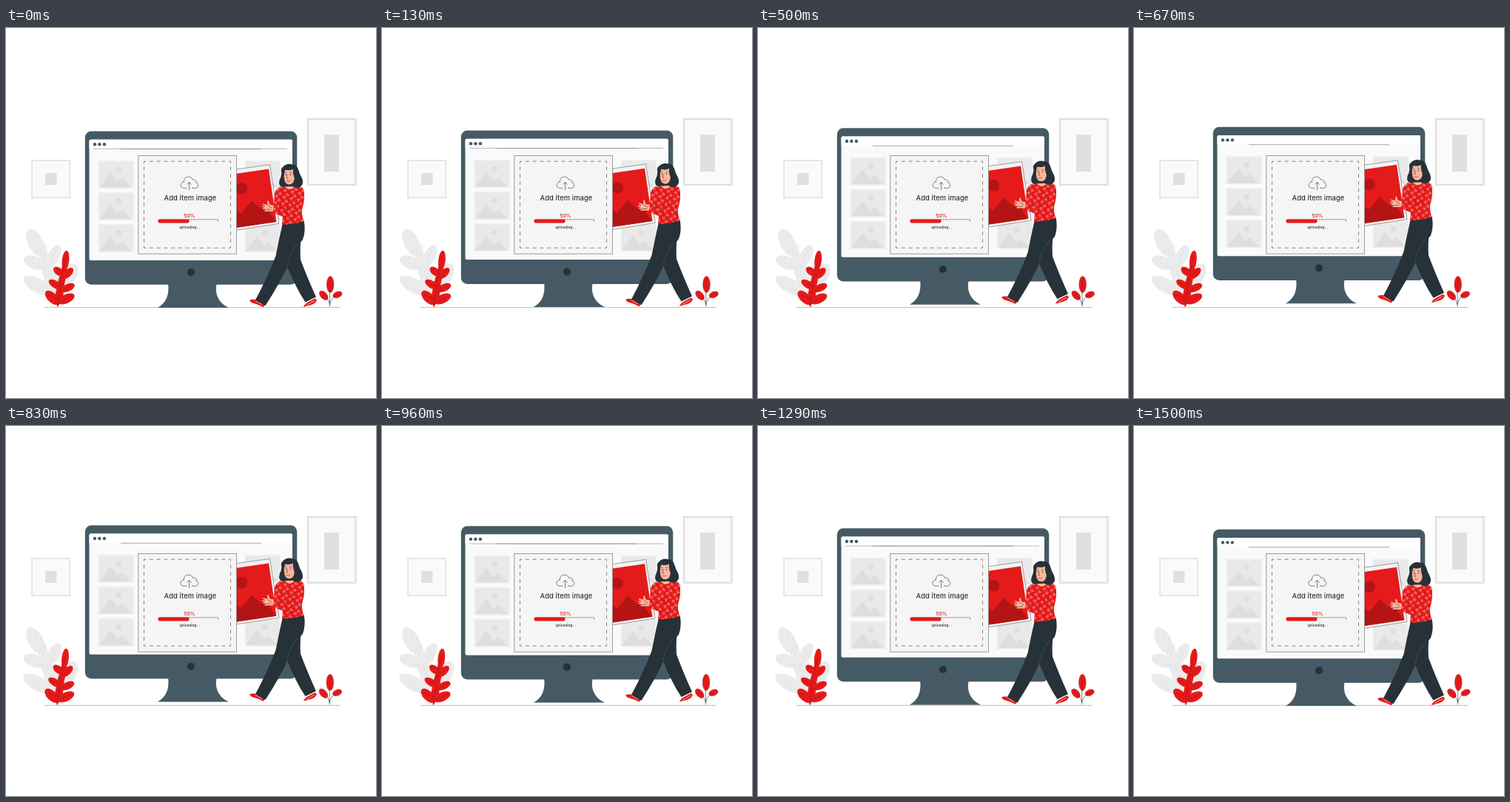
These frames come from a looping animation (500x500 px, 1.54 s). An HTML page:

```html
<!DOCTYPE html>
<html lang="en">
<head>
<meta charset="utf-8">
<title>Add item image</title>
<style>
  html, body { margin: 0; width: 100%; height: 100%; overflow: hidden; background: #fff; }
  svg { display: block; width: 100vw; height: 100vh; }
  text { font-family: Inter, sans-serif; text-anchor: middle; }
  .red { fill: #e51a1a; }
  .dark { fill: #263238; }
  .slate { fill: #455a64; }
  .skin { fill: #ffb59d; }
  .line { fill: none; stroke: #263238; stroke-width: .6; stroke-linecap: round; stroke-linejoin: round; }
  .vein { fill: none; stroke: #a81414; stroke-width: .6; stroke-linecap: round; }
</style>
</head>
<body>
<svg viewBox="0 0 500 500">
  <defs>
    <pattern id="knit" width="10" height="9" patternUnits="userSpaceOnUse" patternTransform="translate(365 215) rotate(10)">
      <path d="M1 2.2L4.4 1.4L3.2 4.6ZM6.4 5.6L9 8.2L5.6 8.4Z" fill="none" stroke="#ffd9d5" stroke-width=".6"/>
    </pattern>
    <g id="thumb">
      <rect x="124.5" y="179" width="48.5" height="38" fill="#f0f0f0"/>
      <rect x="126" y="180.5" width="45.5" height="35" fill="#e9e9e9"/>
      <path d="M126 215.500L141 195.500L151 208L157 202.500L169 215.500Z" fill="#dedede"/>
      <circle cx="152.300" cy="191" r="3.700" fill="#dedede"/>
    </g>
  </defs>

  <rect width="500" height="500" fill="#fff"/>

  <!-- wall frames -->
  <g fill="#fafafa" stroke="#e0e0e0">
    <rect x="35" y="179" width="51.300" height="50.300" stroke-width="1.600"/>
    <rect x="408" y="123" width="64.500" height="88.700" stroke-width="2.400"/>
  </g>
  <path d="M53 196h15.500v16h-15.500ZM430 144h20v50h-20Z" fill="#e0e0e0"/>

  <g id="backPlant" fill="#ebebeb"></g>
  <path d="M72 376C64 340 48 302 37 281M45 299L33 315M57 326L67 302M59 330L35 317M68 358L88 330M70 366L33 346" fill="none" stroke="#e0e0e0" stroke-width=".7"/>
  <path d="M52 377.500H452" stroke="#aaa" stroke-width=".7"/>

  <g id="float">
    <!-- monitor -->
    <path class="slate" d="M219 344C221 360 217 371 205 378H301C288 372 281 360 285 344Z"/>
    <rect class="slate" x="106.800" y="139.500" width="286.500" height="207.300" rx="8.500"/>
    <rect x="112.500" y="150.700" width="274.500" height="163.300" rx="2" fill="#fafafa"/>
    <path d="M112.500 163V152.700q0-2 2-2H385q2 0 2 2V163Z" fill="#fff"/>
    <g class="slate">
      <circle cx="120" cy="157.200" r="2.200"/><circle cx="126.400" cy="157.200" r="2.200"/><circle cx="132.900" cy="157.200" r="2.200"/>
    </g>
    <path id="ends" d="M118 163.300H380" stroke="#999" stroke-width=".7"/>
    <path d="M155 163.500H345" stroke="#888" stroke-width=".7"/>
    <circle class="dark" cx="250" cy="330.200" r="5.100"/>
    <use href="#thumb"/><use href="#thumb" y="43"/><use href="#thumb" y="86"/>
    <use href="#thumb" x="198"/><use href="#thumb" x="198" y="43"/><use href="#thumb" x="198" y="86"/>

    <!-- photo card -->
    <path d="M300 192.500L356.500 184.700L369 264.300L300 275Z" fill="#f3f3f3" stroke="#777" stroke-width=".7"/>
    <path class="red" d="M300 198.600L355 190.600L365.500 262L300 271.500Z"/>
    <path d="M300 242L311 246L317.500 251L332.500 233.500L344 244.500L349.500 240L364.500 262L300 271.500Z" fill="#b41414"/>
    <circle cx="318.200" cy="217" r="7.700" fill="#b41414"/>

    <!-- legs and shoes -->
    <path class="red" d="M329.500 367.500Q334 366 339 367.500L350 374L347.500 377.300Q341 373.500 333 371.500Q329.500 370 329.500 367.500Z"/>
    <path class="red" d="M402 377Q403.500 373 408 370.500L417.500 365.500L420 367.500Q418.500 372 413 374Q407 375.500 402 377Z"/>
    <path d="M337 368.500L346 374M406 374.500L417 368.500" stroke="#fff" stroke-width=".6"/>
    <path class="dark" d="M378 278L380 322Q391 350 404.500 370.500L419 363.500Q407 337 398 313Q397 298 399 280Z"/>
    <path class="dark" d="M374 263Q369 285 364.500 308Q353 338 337 367.500L350.500 375.200Q369 347 382 319Q391 297 401 286Q405.500 274 402.500 260Z"/>
    <path d="M380 322Q382 306 394 291" fill="none" stroke="#55656c" stroke-width=".5"/>

    <!-- torso -->
    <path id="body" class="red" d="M375 213.500Q365 215 363 224L361.500 243L374 254L373 265.500Q388 266 402.500 261Q398.500 251 400.500 240Q404.500 224 402 217.500Q398 212.500 390 212.500Z"/>
    <path class="skin" d="M377 206H389.500L391 213.500Q385 222 376 214Z"/>

    <!-- hands -->
    <path class="skin" d="M363 240L356.500 238.800L354.500 233Q352.500 233 353.500 239L347 237.500Q345.700 238.500 351 241L346 240.800Q344.500 242 350.500 243.200L346.500 243.800Q346 245.500 352 245.500L349 247Q350 248.500 355 247.500L363 248Z"/>
    <path class="line" d="M354 240L359 243M352 245.500L358 245" stroke="#d98775"/>
    <path class="red" d="M402 219Q405 231 399.500 247Q397 256 387 257.500Q372 256 360.500 248.500L362 240.200Q374 245 385 243.500L388 226Z"/>
    <path fill="url(#knit)" d="M375 213.500Q365 215 363 224L361.500 240L360.500 248.500L374 254L373 265.500Q388 266 402.500 261Q398.500 251 400.500 240Q404.500 224 402 217.500Q398 212.500 390 212.500Q384 220 375 213.500Z"/>
    <path class="vein" d="M362 240.500Q374 245 385 243.500L388 232M374 254Q381 257.500 388 257.300"/>

    <!-- head -->
    <path class="dark" d="M374 188Q379 182.500 386 184.200Q393 184.500 395 191Q396.500 197 400 203Q403 211 398 214.500Q393 217.500 387 214L377 214.500Q370 216.500 369 209.500Q369 206 371.500 201Q373 196 371.800 192Q372 189 374 188Z"/>
    <path class="skin" d="M377.500 191.500Q384 193.500 388.500 190.500Q391 197 389.500 205Q388 212 382 211.500Q376.500 211 375.800 202Q375.500 196 377.500 191.500Z"/>
    <path class="dark" d="M375.500 191Q384 194 388 189Q387 198 391 205Q395 198 391 188L381 185Z"/>
    <path class="line" d="M377.300 196.200L379 195.200M383.500 195.300L386 196M380.200 199L379 203L380.700 203.300"/>
    <circle class="dark" cx="378.800" cy="198.300" r=".75"/><circle class="dark" cx="384.500" cy="198.500" r=".75"/>
    <path d="M379 206.500Q381.500 208.500 384 206.200" fill="none" stroke="#c52c2c" stroke-width=".8"/>
  </g>

  <!-- upload panel -->
  <rect x="178.800" y="172.500" width="132.700" height="132.700" fill="#f5f5f5" stroke="#858585" stroke-width=".8"/>
  <rect x="186.500" y="180.200" width="117" height="117" fill="none" stroke="#666" stroke-width=".8" stroke-dasharray="5 4.750" stroke-dashoffset="2.500"/>
  <path class="line" stroke="#555" d="M244 216.300H240.500C234.500 216.300 234.500 208.500 240.300 208.200C239.500 200 250.500 198.500 252.300 205.300C256 204.200 257.500 207.200 256.800 209C261 209.500 260.500 216.300 256 216.300H251.500M247.600 218.800V208.500M244.800 211.300L247.600 208.300L250.400 211.300"/>
  <text x="249" y="233.200" font-size="9.300" font-weight="500" letter-spacing=".12" fill="#263238">Add item image</text>
  <text x="248" y="255.700" font-size="6.800" font-weight="500" fill="#e51a1a">50%</text>
  <path d="M207 258.800H286.500V262.300" fill="none" stroke="#777" stroke-width=".7"/>
  <rect class="red" x="205.300" y="258.500" width="42.300" height="4.900" rx="2.300"/>
  <text x="248" y="271" font-size="4.900" font-weight="500" fill="#263238">uploading...</text>

  <!-- swaying plants -->
  <g id="leaf">
    <g id="frontPlant" class="red"></g>
    <path class="vein" d="M69.500 376Q73 342 81 309M77 328L67 326M75.500 338L88 327M73.500 350L61 344M72.500 357L89 348M71 366L57 361M70 372L88 363"/>
  </g>
  <g id="sprig">
    <path class="line" d="M437.500 376V345M437.700 374Q437 368 431 362.500M437.700 373Q439 365 447 360.500"/>
    <g id="sprigLeaves" fill="#e51a1a" stroke="#b41414" stroke-width=".5"></g>
    <path class="vein" d="M438 357V340M434.500 366L427 358M443 363L450 359.500"/>
  </g>
</svg>
<script>
const LOOP = 1540;
const $ = id => document.getElementById(id);

// Each leaf: x, y, rx, ry, angle
const leaves = list => list.map(([x, y, rx, ry, a]) =>
  `<ellipse cx="${x}" cy="${y}" rx="${rx}" ry="${ry}" transform="rotate(${a} ${x} ${y})"/>`).join('');

$('backPlant').innerHTML = leaves([
  [40, 290, 20, 10, 62], [38, 317, 15, 8.5, 20], [64, 309, 17, 8, -62],
  [43, 348, 22, 9.5, 30], [82, 337, 22, 11, -55]
]) + '<path d="M42 292L54 294L58 314L70 330L82 350L72 377L58 364L52 340L46 322Z"/>';

$('frontPlant').innerHTML = leaves([
  [80.5, 314, 4.8, 13.2, 6], [83.5, 331.5, 9.5, 5, -45], [71, 329, 8, 5, 40],
  [83.5, 351, 10, 5, -25], [66.5, 346.5, 10, 5, 32],
  [81.5, 366, 12, 6, -25], [62.5, 364.5, 12, 6.5, 45]
]) + '<path d="M77 318L83 326L79 346L77 364L69.500 377.500L66 364L70 344Z"/>';

$('sprigLeaves').innerHTML = leaves([
  [438.2, 346.5, 4.8, 11, 0], [429.3, 361.3, 7.3, 4.3, 48], [448, 360.4, 6.4, 4, -22]
]);

// Smooth periodic curve through [time, value] points
function curve(pts) {
  const n = pts.length;
  const at = i => {
    const k = Math.floor(i / n), [t, v] = pts[i - k * n];
    return [t + k * LOOP, v];
  };
  const slope = i => {
    const [t0, v0] = at(i - 1), [t1, v1] = at(i + 1);
    return (v1 - v0) / (t1 - t0);
  };
  return t => {
    let i = 0;
    while (i < n - 1 && t >= pts[i + 1][0]) i++;
    const [t0, v0] = at(i), [t1, v1] = at(i + 1), d = t1 - t0, u = (t - t0) / d;
    const ease = u * u * (3 - 2 * u);
    return v0 + (v1 - v0) * ease
      + d * u * (1 - u) * ((1 - u) * slope(i) - u * slope(i + 1));
  };
}

const lift = curve([[0, 0], [290, -2.1], [500, -4.2], [670, -5.8], [960, -4.3], [1130, -2.5], [1500, .2]]);
const sway = curve([[0, 0], [290, .9], [500, .7], [670, -.6], [960, -.2], [1130, .2], [1500, .2]]);

function draw(t) {
  const x = sway(t);
  $('float').setAttribute('transform', `translate(0 ${lift(t)})`);
  $('leaf').setAttribute('transform', `translate(${x} 0)`);
  $('sprig').setAttribute('transform', `translate(${x * .7} 0)`);
  const wide = t < 400 || (t > 850 && t < 1320);
  $('ends').setAttribute('visibility', wide ? 'visible' : 'hidden');
}

const start = performance.now();
function tick() {
  draw((performance.now() - start) % LOOP);
  requestAnimationFrame(tick);
}
draw(0);
requestAnimationFrame(tick);
</script>
</body>
</html>
```
